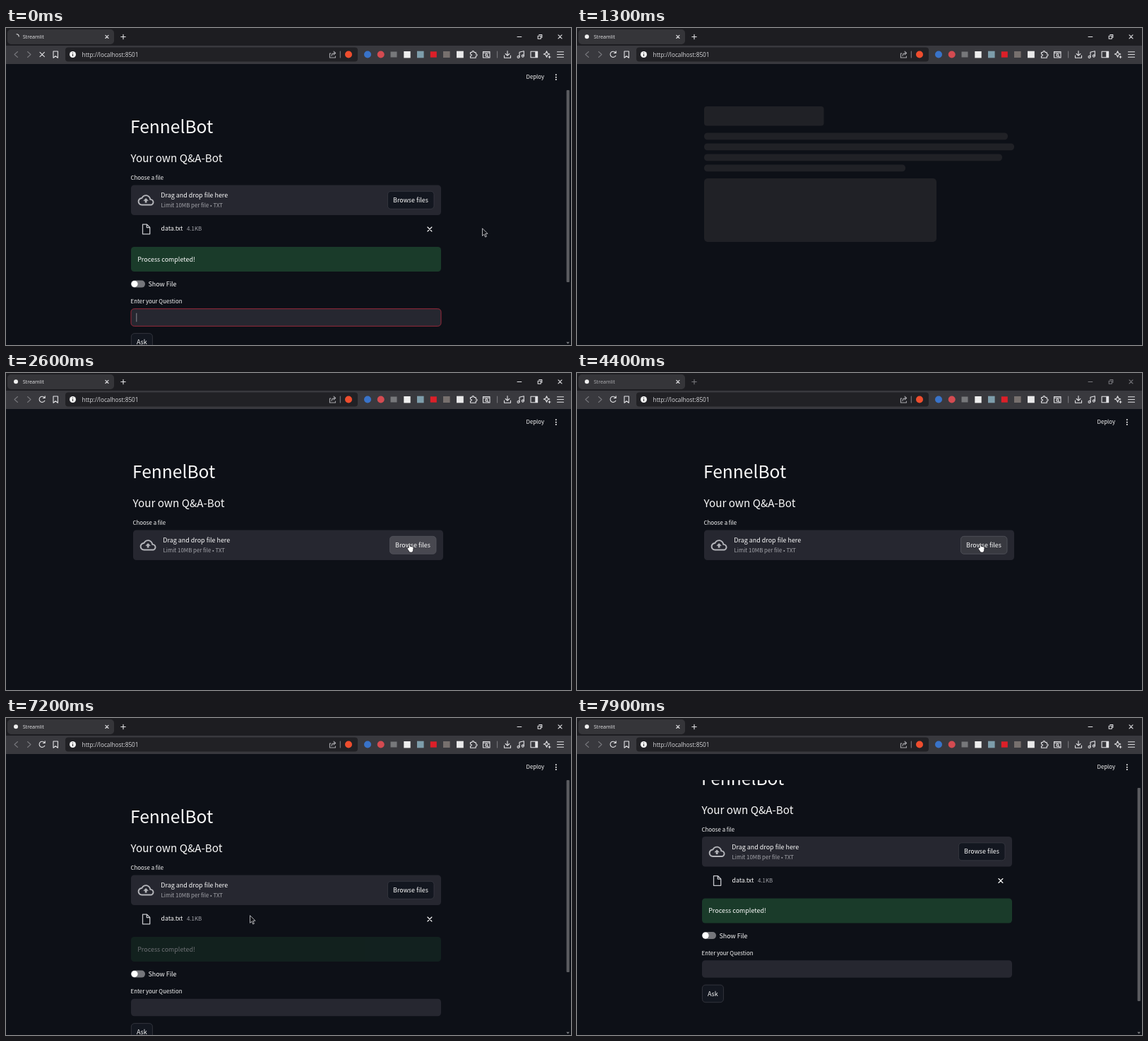
Animation of 800 by 449 pixels, one loop 8 s. Source, as an HTML page:

```html
<!DOCTYPE html>
<html lang="en">
<head>
<meta charset="utf-8">
<title>Q&amp;A bot demo</title>
<style>
html, body { margin: 0; width: 100%; height: 100%; overflow: hidden; background: #0d1017; }
svg { display: block; width: 100%; height: 100%; }
text { fill: #fafafa; font: 8.95px "Noto Sans CJK JP", "Noto Sans CJK SC", "Noto Sans CJK", "Noto Sans", sans-serif; white-space: pre; }
.small { font-size: 7.85px; }
.muted { fill: #a3a4aa; }
.ui { font-family: "Open Sans", "Noto Sans", sans-serif; }
.line { fill: none; stroke: #e2e2e5; stroke-width: 1.1; stroke-linecap: round; stroke-linejoin: round; }
.dim { stroke: #77777c; }
.panel { fill: #262730; }
.button { fill: #131720; stroke: #3a3b45; stroke-width: .8; }
.bone { fill: #202126; }
</style>
</head>
<body>
<svg viewBox="0 0 800 449">
  <defs>
    <clipPath id="view"><rect x="0" y="88" width="800" height="361"/></clipPath>
  </defs>
  <rect width="800" height="449" fill="#0d1017"/>

  <g id="skeleton">
    <rect class="bone" x="180" y="111" width="169.5" height="27.5" rx="4"/>
    <rect class="bone" x="180" y="148.5" width="430" height="9.8" rx="4.5"/>
    <rect class="bone" x="180" y="163.5" width="439" height="9.8" rx="4.5"/>
    <rect class="bone" x="180" y="178.5" width="422" height="9.8" rx="4.5"/>
    <rect class="bone" x="180" y="193.5" width="285" height="9.8" rx="4.5"/>
    <rect class="bone" x="180" y="213" width="329" height="90" rx="5"/>
  </g>

  <g id="app">
    <g clip-path="url(#view)">
      <g id="content">
        <text x="179" y="149" font-weight="700" style="font-size:24.6px">FennelBot</text>
        <text x="179.6" y="190" font-weight="700" style="font-size:15.2px">Your own Q&amp;A-Bot</text>
        <text class="small" x="179.6" y="215">Choose a file</text>
        <rect class="panel" x="180" y="222.5" width="439" height="42.5" rx="4.5"/>
        <path transform="translate(189.7 232.4) scale(.95)" fill="#b4b5ba" d="M19.35 10.04C18.67 6.59 15.64 4 12 4 9.11 4 6.6 5.64 5.35 8.04 2.34 8.36 0 10.91 0 14c0 3.31 2.69 6 6 6h13c2.76 0 5-2.24 5-5 0-2.64-2.05-4.78-4.65-4.96zM19 18H6c-2.21 0-4-1.79-4-4 0-2.05 1.53-3.76 3.56-3.97l1.07-.11.5-.95C8.08 7.14 9.94 6 12 6c2.62 0 4.88 1.86 5.39 4.43l.3 1.5 1.53.11c1.56.1 2.78 1.41 2.78 2.96 0 1.65-1.35 3-3 3zM8 13h2.55v3h2.9v-3H16l-4-4z"/>
        <text x="222.3" y="240">Drag and drop file here</text>
        <text class="small muted" x="222.5" y="254">Limit 10MB per file • TXT</text>
        <rect id="browse" class="button" x="543.4" y="231.3" width="65.6" height="25" rx="4.5"/>
        <text x="576" y="246.8" text-anchor="middle">Browse files</text>
        <g id="file">
          <path class="line" style="stroke:#c4c5ca;stroke-width:1.3" d="M196.5 278.2h6l4.2 4.2v9.4h-10.2zM202.3 278.4v4.2h4.2"/>
          <text x="222.5" y="287.2" style="font-size:8.75px">data.txt</text>
          <text class="small muted" x="259" y="287.2">4.1KB</text>
          <path class="line" style="stroke:#fff" d="M599.9 282l6 6m0-6l-6 6"/>
        </g>
        <g id="answer">
          <g id="alert">
            <rect x="180" y="310" width="439" height="35" rx="4.5" fill="#1a3b2a"/>
            <text x="189.2" y="330.8">Process completed!</text>
          </g>
          <rect x="180" y="357.6" width="20" height="10" rx="5" fill="#75767b"/>
          <circle cx="185" cy="362.6" r="4.6" fill="#fff"/>
          <text x="204.4" y="366">Show File</text>
          <text class="small" x="179.6" y="390">Enter your Question</text>
          <rect id="input" class="panel" x="180" y="397.7" width="439" height="24.6" rx="4.5"/>
          <path id="caret" stroke="#a5a6ab" stroke-width=".8" d="M187.8 403.8v12.4"/>
          <rect class="button" x="180.4" y="432.6" width="30" height="24.6" rx="4.5"/>
          <text x="195.3" y="448" text-anchor="middle">Ask</text>
        </g>
      </g>
    </g>
    <g id="running">
      <g class="line" style="stroke:#a0a1a6">
        <circle cx="681.5" cy="73" r="3.2"/><circle cx="690.5" cy="73" r="3.2"/>
        <path d="M686 74.5v-3.4l-2.4-2 3-2.8 2 2.2h2.6"/>
        <circle cx="688.2" cy="63.7" r=".8"/>
      </g>
      <text class="small" x="703.5" y="72.2">Stop</text>
    </g>
    <text class="small" x="736.5" y="72.2">Deploy</text>
    <g fill="#fafafa"><circle cx="778.8" cy="66.3" r="1"/><circle cx="778.8" cy="69.7" r="1"/><circle cx="778.8" cy="73.1" r="1"/></g>
    <g id="scrollbar">
      <rect id="thumb" x="793.6" width="4.2" rx="1" fill="#5b5c60"/>
      <path d="M793.3 444.8h4.6l-2.3 2.8z" fill="#7d7e82"/>
    </g>
  </g>

  <rect width="800" height="26" fill="#1d1d21"/>
  <rect y="25" width="800" height="26" fill="#39393e"/>
  <rect x="2" y="2" width="151" height="21" rx="5" fill="#353539"/>
  <rect x="84" y="27.5" width="414" height="20" rx="4" fill="#212125"/>
  <path id="spinner" class="line" d="M15 8.8a3.2 3.2 0 0 1 3.2 3.2"/>
  <circle id="favicon" cx="14" cy="12.3" r="3" fill="#f0f0f0"/>
  <text id="tab" class="ui" x="23.7" y="15" style="font-size:7.15px">Streamlit</text>
  <path class="line" d="M140.8 10.3l4.2 4.2m0-4.2l-4.2 4.2"/>
  <g id="frame" class="line">
    <path d="M162.8 12.5h6.4m-3.2-3.2v6.4M724 12.5h5.8M782 9.8l5 5m0-5l-5 5"/>
    <path d="M753.2 11.2h4v4h-4zM754.8 9.5h4v4"/>
  </g>
  <path class="line dim" d="M16.5 33.5l-4.5 4 4.5 4M30.5 33.5l4.5 4-4.5 4"/>
  <path id="stop" class="line" d="M48 34.3l6.4 6.4m0-6.4l-6.4 6.4"/>
  <path id="reload" class="line" d="M54.8 39.3a4.1 4.1 0 1 1-.4-4.6M55.2 32.7v2.8h-2.8"/>
  <path class="line" d="M67 33h6.4v9.2l-3.2-2.5-3.2 2.5z"/>
  <circle cx="94.5" cy="37.5" r="4.5" fill="#f2f2f2"/>
  <path d="M94.5 37v2.8m0-5v.9" stroke="#222" stroke-width="1.1"/>
  <text class="ui" x="107.6" y="40.5" style="font-size:8.27px;fill:#d8d8db">http://localhost:8501</text>
  <path class="line" style="stroke:#a9a9ad" d="M460 36h-1.6v6h8v-2M461 39.5c.3-3 2-4 5-4M464 33.2l2.6 2.3-2.6 2.3"/>
  <path class="line dim" d="M473.3 33v9M695.6 33v9" stroke-width=".8"/>
  <circle cx="485" cy="37.5" r="5" fill="#ee4d2e"/>
  <circle cx="512" cy="37.5" r="5" fill="#3973c9"/>
  <circle cx="530.7" cy="37.5" r="5" fill="#d44b51"/>
  <rect x="544.5" y="33.5" width="9" height="8" fill="#77787b"/>
  <rect x="563.3" y="33" width="9.4" height="9.4" fill="#eee"/>
  <rect x="582" y="32.7" width="9.6" height="9.6" fill="#7e9dab"/>
  <rect x="600.8" y="33.3" width="9" height="8.4" fill="#dc2029"/>
  <rect x="619" y="33" width="9.6" height="9" fill="#77706e"/>
  <rect x="638" y="32.7" width="9.8" height="9.6" fill="#e9e9ea"/>
  <g class="line">
    <path d="M657.5 34.5h2.4c-.5-2.5 3.3-2.5 2.8 0h2.5v2.4c2.5-.5 2.5 3.2 0 2.8v2.5h-7.7v-2.5c2.5.3 2.5-3 0-2.6z"/>
    <path d="M675.5 33.5h9.5v8.5h-9.5zM675.5 35.2h9.5M681.5 39.8l1.7 1.4"/><circle cx="680.3" cy="38.5" r="1.6"/>
    <path d="M710 32.5v6.5m-2.8-2.5l2.8 2.7 2.8-2.7M705.5 39v3.2h9V39"/>
    <path d="M727 41v-6.7l6.3-1.5v6.7"/><circle cx="725.5" cy="41" r="1.5"/><circle cx="731.8" cy="39.6" r="1.5"/>
    <path d="M743 33.2h9.6v8.6H743z"/><path d="M749.8 33.5h2.5v8h-2.5z" fill="#e2e2e5"/>
    <path d="M765.5 32.8l1.2 3 3 1.2-3 1.2-1.2 3-1.2-3-3-1.2 3-1.2zM769.5 39.5v3m-1.5-1.5h3"/>
    <path d="M780.5 33.8h9m-9 3.7h9m-9 3.7h9"/>
  </g>

  <path id="arrow" d="M0 0v10.6l2.4-2.2 1.8 3.9 1.7-.8-1.8-3.8 3.4-.2z" fill="#101217" stroke="#d9d9dc" stroke-width=".8" stroke-linejoin="round"/>
  <path id="hand" d="M2.2 7.2V1.2c0-1.5 1.9-1.5 1.9 0v3.6l3.8.8q1.2.4 1.1 1.6l-.5 3.6-1.1 2.7H3.6L.4 8.6c-.7-1.2.8-2.2 1.8-1.4z" fill="#fff" stroke="#17181d" stroke-width=".7"/>
</svg>
<script>
const LOOP = 8000;
const el = {};
document.querySelectorAll("svg [id]").forEach(node => el[node.id] = node);

const clamp = v => Math.max(0, Math.min(1, v));
const ramp = (t, from, to) => clamp((t - from) / (to - from));
const smooth = p => p * p * (3 - 2 * p);
const mix = (a, b, p) => a + (b - a) * p;
const show = (name, on) => el[name].style.display = on ? "" : "none";
const set = (name, attrs) => {
  for (const key in attrs) el[name].setAttribute(key, attrs[key]);
};

function drawPage(t) {
  const before = t < 400;
  const after = t >= 6900;
  const wide = before || after;
  const scroll = smooth(ramp(t, 7350, 7900));

  show("skeleton", t >= 800 && t < 1700);
  el.skeleton.style.opacity = ramp(t, 700, 1200);
  show("app", before || t >= 1700);
  show("file", before || t >= 5000);
  show("answer", wide);
  show("running", t >= 5100 && t < 6900);
  show("scrollbar", wide);
  show("caret", before);

  set("content", { transform: `translate(${wide ? -3 : 0} ${-54.5 * scroll})` });
  set("thumb", { y: mix(88, 99, scroll), height: mix(272, 302, scroll) });
  set("input", { stroke: before ? "#a82c3e" : "none", "stroke-width": 0.9 });
  el.alert.style.opacity = before ? 1 : mix(0.4, 1, ramp(t, 7200, 7500));

  const hover = t >= 2400 && t < 4600;
  const pressed = t >= 2500 && t < 2800;
  el.browse.style.fill = pressed ? "#484850" : hover ? "#383940" : "";
  el.browse.style.stroke = hover ? "#55565e" : "";
}

function drawChrome(t) {
  const loading = t < 1100;
  const blurred = t >= 2800 && t < 4600;
  show("spinner", loading);
  show("favicon", !loading);
  show("stop", loading);
  show("reload", !loading);
  set("spinner", { transform: `rotate(${t * 0.36} 15 12)` });
  el.frame.style.stroke = blurred ? "#77777c" : "";
  el.tab.style.fill = blurred ? "#b2b2b5" : "#e4e4e6";
}

function drawPointer(t) {
  const p = smooth(ramp(t, 1900, 2450));
  const picked = t >= 4600;
  const x = picked ? 345.5 : mix(674.5, 568, p);
  const y = picked ? 279.7 : mix(283.8, 240.6, p);
  const hand = t >= 2400 && !picked;
  const hidden = (t >= 1200 && t < 1900) || t >= 7500;
  const transform = `translate(${x} ${y})`;
  show("hand", hand);
  show("arrow", !hand && !hidden);
  set("hand", { transform });
  set("arrow", { transform });
}

function draw(now) {
  const t = now % LOOP;
  drawPage(t);
  drawChrome(t);
  drawPointer(t);
}

const start = performance.now();
function tick() {
  draw(performance.now() - start);
  requestAnimationFrame(tick);
}
tick();
</script>
</body>
</html>
```
